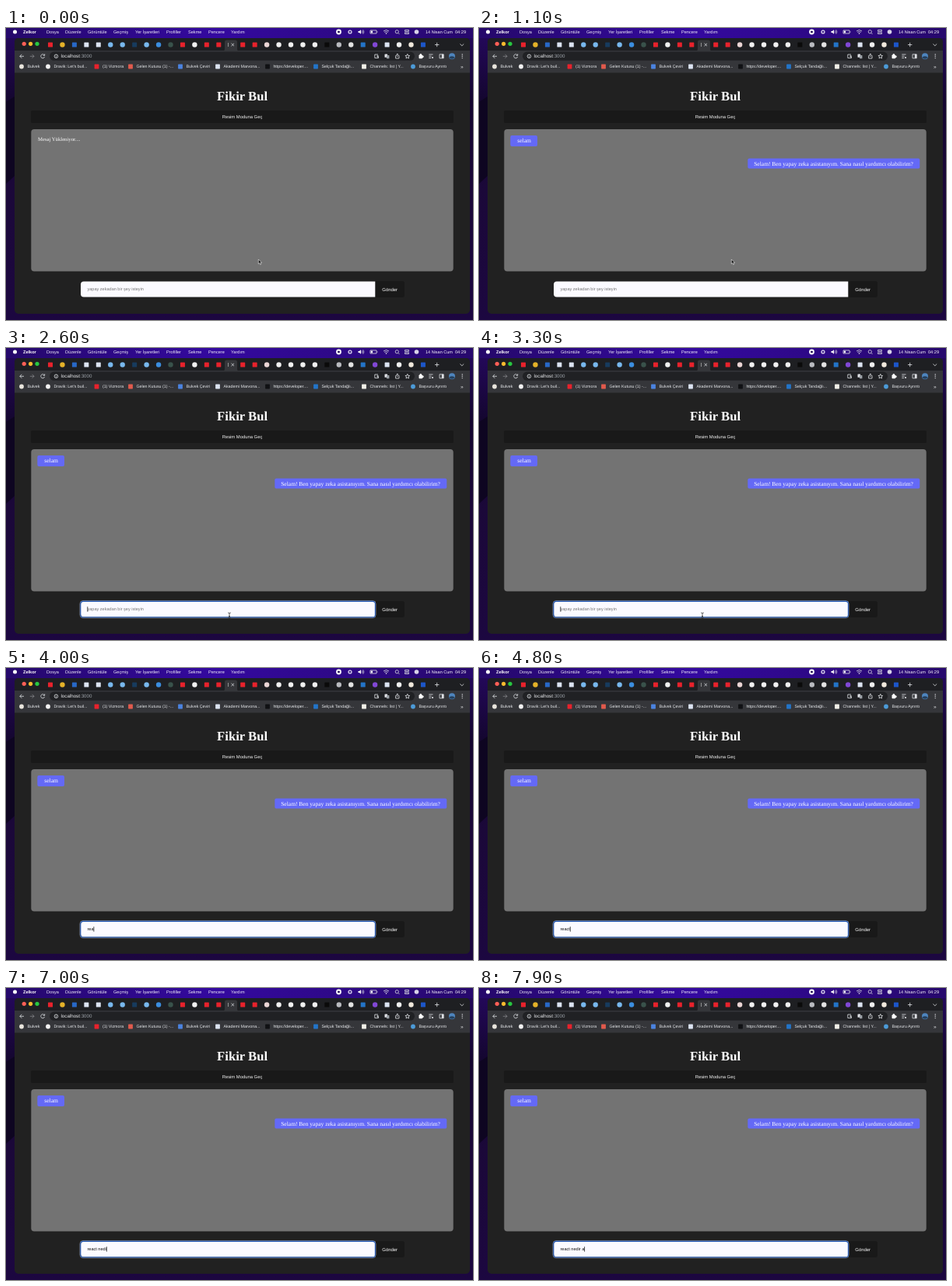
An HTML page for the animation above (8 s loop, 600 by 375 pixels).

```html
<!DOCTYPE html>
<html lang="tr">
<head>
<meta charset="utf-8">
<title>Fikir Bul</title>
<style>
  html, body { margin: 0; width: 100%; height: 100%; overflow: hidden; background: #12062b; }
  svg { display: block; width: 100vw; height: 100vh; }
  text { font-family: "Liberation Sans", Arial, sans-serif; text-rendering: geometricPrecision; white-space: pre; }
  .serif { font-family: "Liberation Serif", "Times New Roman", serif; }
  .line { fill: none; stroke: #dfe1e5; stroke-width: .8; }
</style>
</head>
<body>
<svg id="stage" viewBox="0 0 600 375">
  <defs>
    <linearGradient id="menu">
      <stop offset="0" stop-color="#25086a"/>
      <stop offset=".45" stop-color="#3409a0"/>
      <stop offset="1" stop-color="#27086c"/>
    </linearGradient>
    <linearGradient id="wall" x2="0" y2="1">
      <stop offset="0" stop-color="#25085f"/>
      <stop offset=".25" stop-color="#14062f"/>
      <stop offset=".55" stop-color="#1b0839"/>
      <stop offset="1" stop-color="#1c0740"/>
    </linearGradient>
  </defs>
  <rect width="600" height="375" fill="url(#wall)"/>
  <path d="M0 95L11 88V190L0 200Z" fill="#0e0521"/>
  <rect width="600" height="13" fill="url(#menu)"/>
  <g id="menubar"></g>
  <rect x="11" y="13" width="585" height="354" rx="5" fill="#212121"/>
  <path d="M11 30V18a5 5 0 0 1 5-5H591a5 5 0 0 1 5 5V30Z" fill="#1e1f22"/>
  <rect x="11" y="29" width="585" height="28.5" fill="#35363a"/>
  <g id="toolbar"></g>
  <g id="page"></g>
  <g id="loading"></g>
  <g id="chat"></g>
  <g id="form"></g>
  <g id="focus">
    <rect x="95" y="324.6" width="380" height="22" rx="4" fill="none" stroke="#c3cce0" stroke-width=".6"/>
    <rect x="95.8" y="325.4" width="378.6" height="20.4" rx="3.4" fill="none" stroke="#2358b5" stroke-width="1.1"/>
  </g>
  <text id="hint" x="104.5" y="337.4" font-size="5.55" fill="#757575">yapay zekadan bir şey isteyin</text>
  <text id="typed" x="104.5" y="337.4" font-size="5.55" fill="#111"></text>
  <rect id="caret" y="332.2" width=".7" height="6.4" fill="#000"/>
  <path id="arrow" d="M0 0V6L1.4 4.8L2.4 7L3.4 6.5L2.5 4.4H4.3Z" fill="#111" stroke="#eee" stroke-width=".6"/>
  <path id="beam" d="M-1.8 -3.5Q0 -3.5 0 -2.5Q0 -3.5 1.8 -3.5M0 -2.5V2.5M-1.8 3.5Q0 3.5 0 2.5Q0 3.5 1.8 3.5M-1 1H1" fill="none" stroke="#333" stroke-width=".8"/>
</svg>
<script>
const $ = id => document.getElementById(id);
const text = (x, y, size, s, fill = '#e8eaed', more = '') =>
  `<text x="${x}" y="${y}" font-size="${size}" fill="${fill}" ${more}>${s}</text>`;
const rect = (x, y, w, h, fill, r = 0) =>
  `<rect x="${x}" y="${y}" width="${w}" height="${h}" rx="${r}" fill="${fill}"/>`;
const dot = (x, y, r, fill) => `<circle cx="${x}" cy="${y}" r="${r}" fill="${fill}"/>`;
const line = d => `<path class="line" d="${d}"/>`;
const square = (x, y, s, fill) => rect(x - s / 2, y - s / 2, s, s, fill, .6);
// "o" before a colour gives a round icon, "s" a square one
const icon = (x, y, spec, size) =>
  (spec[0] === 'o' ? dot(x, y, size / 2, spec.slice(1)) : square(x, y, size, spec.slice(1)));

const menus = [[52, 'Dosya'], [76, 'Düzenle'], [105, 'Görüntüle'], [138, 'Geçmiş'], [166, 'Yer İşaretleri'],
  [206, 'Profiller'], [234, 'Sekme'], [260, 'Pencere'], [289, 'Yardım']];
$('menubar').innerHTML =
  dot(11.5, 5, 2.5, '#fff') +
  text(22, 7, 5.6, 'Zelkor', '#fff', 'font-weight="bold"') +
  menus.map(([x, s]) => text(x, 7, 5.6, s, '#f0eef8')).join('') +
  dot(427.5, 5, 3.4, '#fff') + square(427.5, 5, 2.6, '#1d0a50') +
  dot(442, 5, 2.6, '#d8d2ec') + dot(442, 5, 1.3, '#3a1b86') +
  '<path d="M452.5 4H454L456 2.2V7.8L454 6H452.5Z" fill="#fff"/>' +
  line('M457.3 3.4Q458.5 5 457.3 6.6M458.8 2.4Q460.8 5 458.8 7.6') +
  line('M468 3H476V7H468ZM477 4.4V5.6') + rect(468.8, 3.7, 2.2, 2.6, '#fff') +
  line('M485 4Q488.5 1 492 4M486.3 5.5Q488.5 3.6 490.7 5.5') + dot(488.5, 7, .8, '#fff') +
  line('M504 6.5L505.5 8M504.4 4.8a2.1 2.1 0 1 1-4.2 0a2.1 2.1 0 1 1 4.2 0') +
  line('M512.5 2.6H517.5V4.3H512.5ZM512.5 5.8H517.5V7.5H512.5Z') +
  dot(527.5, 5, 2.8, '#d9d5e8') +
  text(539, 7, 5.5, '14 Nisan Cum', '#fff') + text(577, 7, 5.6, '04:29', '#fff');

const red = 's#e8222c', blue = 'o#3b8ee0', white = 'o#f1f1f1', pale = 's#dce4f2';
const tabs = [red, 'o#e4b229', 's#2868c7', pale, pale, 'o#78b8ee', 'o#78b8ee', 's#173b5e', 'o#78b8ee', blue,
  'o#39524b', red, white, red, red, null, red, red, 'o#ead5d5', white, white, white, white, 's#0a0a0a',
  'o#b9bbc0', 'o#e2e2e2', 's#2374c8', 'o#8148d5', pale, white, 'o#f0e8dc', 's#1c56c9'];
const marks = [[20, 'o#e8e4dc', 'Bulvek'], [54, white, "Dravik: Let's buil..."], [116.5, red, '(1) Vizmora'],
  [160, 's#e05a4c', 'Gelen Kutusu (1) -...'], [224, 's#4b83e0', 'Bulvek Çeviri'], [272, pale, 'Akademi Marvona...'],
  [336, 's#101114', 'https://developer....'], [398, 's#2374c8', 'Selçuk Tandağlı...'],
  [460, 's#f1efe8', 'Channels: list | Y...'], [523, 'o#4c9bd8', 'Başvuru Ayrıntı']];
$('toolbar').innerHTML =
  ['#fe5f57', '#febc2e', '#28c840'].map((c, i) => dot(23.2 + 8.4 * i, 20.3, 2.6, c)).join('') +
  '<path d="M279 29.5Q281 29 281 27V18Q281 15.5 283.5 15.5H294.5Q297 15.5 297 18V27Q297 29 299 29.5Z" fill="#35363a"/>' +
  tabs.map((t, i) => t ? icon(57 + 15.45 * i, 21.5, t, t[0] === 'o' ? 6.4 : 6) : '').join('') +
  rect(285, 19, .8, 5, '#aaa') + line('M289.6 19.8L293 23.2M293 19.8L289.6 23.2') +
  line('M551 21.5H556.4M553.7 18.8V24.2M583.4 20.5L585.8 22.8L588.2 20.5') +
  line('M23 36.3H17.8M20.3 33.8L17.8 36.3L20.3 38.8') +
  `<g opacity=".45">${line('M30.8 36.3H36M33.5 33.8L36 36.3L33.5 38.8')}</g>` +
  line('M49.4 35A2.5 2.5 0 1 0 49.6 37M49.7 33.4V35.3H47.8') +
  rect(56, 30.6, 469, 11.2, '#202124', 5.6) +
  line('M66.7 36.3a2.3 2.3 0 1 1-4.6 0a2.3 2.3 0 1 1 4.6 0M64.4 36V37.7M64.4 34.6V35.2') +
  text(70.5, 38.3, 6.2, 'localhost<tspan fill="#9aa0a6">:3000</tspan>') +
  line('M478 34H473.8V38.5H478.5V37M476 36.2H479M477.7 34.8V37.8') +
  rect(486.5, 33.5, 3.6, 4.2, '#dfe1e5', .5) + rect(489, 35, 3.4, 4.2, '#9aa0a6', .5) +
  line('M501.5 35.5H500.6V39H505V35.5H504.1M502.8 37V33L501.4 34.4M502.8 33L504.2 34.4') +
  line('M515.8 33.4L516.6 35.4L518.7 35.5L517.1 36.9L517.6 39L515.8 37.9L514 39L514.5 36.9L512.9 35.5L515 35.4Z') +
  rect(530.5, 34.5, 4.7, 4.7, '#fff', .8) + dot(532.8, 34.2, 1.2, '#fff') + dot(535.5, 36.8, 1.2, '#fff') +
  line('M543.3 34H548.5M543.3 36.2H546.5M543.3 38.4H546') + dot(548, 38, 1.1, '#dfe1e5') +
  line('M557 33.8H562.2V38.8H557Z') + rect(559.8, 33.8, 2.4, 5, '#dfe1e5') +
  dot(573, 36.3, 4, '#4e85bd') + '<path d="M569.4 37.5Q573 35 576.6 37.7A4 4 0 0 1 569.4 37.5" fill="#243f5c"/>' +
  [34, 36.3, 38.6].map(y => dot(586.2, y, .7, '#dfe1e5')).join('') +
  marks.map(([x, c, s]) => icon(x, 49.5, c, 5.8) + text(x + 7.4, 51.4, 5.3, s)).join('') +
  text(584, 51.5, 6.5, '»');

const middle = 'text-anchor="middle"';
const serif = 'class="serif"';
$('page').innerHTML =
  text(303.6, 93.3, 16.7, 'Fikir Bul', '#fff', `${serif} ${middle} font-weight="bold"`) +
  rect(32, 106, 543, 16, '#191919', 1.5) +
  text(303.5, 115.7, 5.85, 'Resim Moduna Geç', '#f4f4f4', middle) +
  rect(32.3, 130, 542.4, 182.6, '#737373', 4);
$('loading').innerHTML = text(41, 144.5, 6.7, 'Mesaj Yükleniyor....', '#fff', serif);
$('chat').innerHTML =
  rect(40.3, 138, 34.7, 14, '#6469f6', 2) + text(49.3, 147.2, 7.52, 'selam', '#fff', serif) +
  rect(345.3, 167.6, 221, 13, '#6469f6', 2) +
  text(353.2, 176.5, 7.52, 'Selam! Ben yapay zeka asistanıyım. Sana nasıl yardımcı olabilirim?', '#fff', serif);
$('form').innerHTML =
  rect(470, 325, 42, 21, '#191919', 3) +
  '<path d="M474.3 325.6H100a4 4 0 0 0-4 4V341.6a4 4 0 0 0 4 4H474.3Z" fill="#fbfaff"/>' +
  text(493.2, 337.5, 5.95, 'Gönder', '#fff', middle);

const LOOP = 8000, REPLY = 900, MOVE = 1700, FOCUS = 2300;
const phrase = 'react nedir a';
const keys = [3500, 3700, 3900, 4300, 4500, 5300, 5900, 6400, 6700, 6900, 7100, 7400, 7700];
const show = (id, on) => $(id).style.display = on ? '' : 'none';
const place = (id, x, y) => $(id).setAttribute('transform', `translate(${x} ${y})`);

function draw(t) {
  const count = keys.filter(k => k <= t).length;
  const focused = t >= FOCUS;
  show('loading', t < REPLY);
  show('chat', t >= REPLY);
  show('focus', focused);
  show('hint', !count);
  $('typed').textContent = phrase.slice(0, count);
  const lastInput = count ? keys[count - 1] : FOCUS;
  show('caret', focused && (t - lastInput) % 1000 < 500);
  $('caret').setAttribute('x', 104.5 + (count ? $('typed').getComputedTextLength() : 0));

  const p = Math.min(1, Math.max(0, (t - MOVE) / 450));
  const ease = p * p * (3 - 2 * p);
  const x = 324.3 - 37.3 * ease, y = 297 + 46.5 * ease;
  const overInput = y > 325;
  show('arrow', !overInput && !count);
  show('beam', overInput && !count);
  place('arrow', x, y);
  place('beam', x, y);
}

const start = performance.now();
(function frame() {
  draw((performance.now() - start) % LOOP);
  requestAnimationFrame(frame);
})();
</script>
</body>
</html>
```
